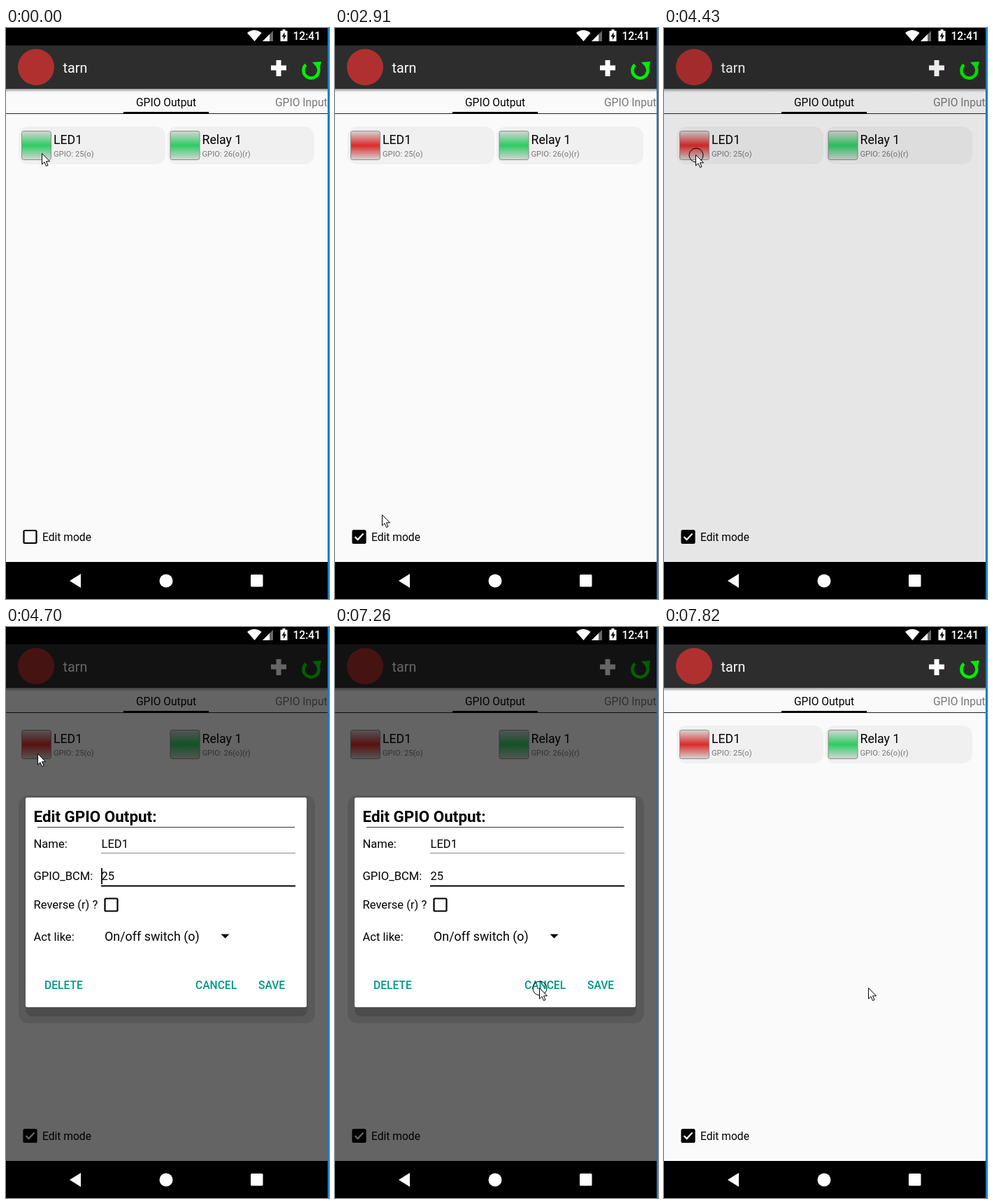
An HTML page that plays this animation: 462 by 817 pixels, repeating every 8000 ms.

```html
<!DOCTYPE html>
<html lang="en">
<head>
<meta charset="utf-8">
<title>GPIO remote</title>
<style>
  html, body { margin: 0; width: 100%; height: 100%; overflow: hidden; background: #000; }
  svg { display: block; width: 462px; height: 817px; font-family: Roboto, sans-serif; }
  .small { font-size: 11.2px; fill: #777; }
  .body { font-size: 15.6px; }
  .form { font-size: 16.6px; }
  .item { font-size: 17.7px; }
  .action { font-size: 15.6px; font-weight: 500; fill: #009688; }
  .check { stroke: #000; stroke-width: 2.2; }
</style>
</head>
<body>
<svg viewBox="0 0 462 817">
  <defs>
    <linearGradient id="green" x2="0" y2="1">
      <stop offset="0" stop-color="#d6d6d6"/>
      <stop offset=".5" stop-color="#2ecc63"/>
      <stop offset="1" stop-color="#d6d6d6"/>
    </linearGradient>
    <linearGradient id="red" x2="0" y2="1">
      <stop offset="0" stop-color="#d6d6d6"/>
      <stop offset=".5" stop-color="#dc2a2a"/>
      <stop offset="1" stop-color="#d6d6d6"/>
    </linearGradient>
    <linearGradient id="shade" x2="0" y2="1">
      <stop offset="0" stop-color="#999"/><stop offset="1" stop-color="#fafafa"/>
    </linearGradient>
    <clipPath id="screen"><rect width="460" height="817"/></clipPath>
  </defs>

  <g clip-path="url(#screen)">
    <rect width="460" height="817" fill="#fafafa"/>
    <rect y="25" width="460" height="62" fill="#2d2d2d"/>
    <rect y="87" width="460" height="5" fill="url(#shade)"/>

    <circle cx="43" cy="56" r="26" fill="#b03030"/>
    <text x="81.5" y="64" font-size="19.8" fill="#fff">tarn</text>
    <path d="M379 57h22M390 46v23" stroke="#fff" stroke-width="7"/>
    <path d="M429 52.5A11 11 0 1 0 445.5 54.5" fill="none" stroke="#00f000" stroke-width="4.5"/>
    <path d="M438 49l13-1-3 12z" fill="#00f000"/>

    <text class="body" x="186" y="112">GPIO Output</text>
    <text class="body" x="385" y="112" fill="#777">GPIO Input</text>
    <path d="M0 122.5h460" stroke="#222"/>
    <path d="M168 121.5h122" stroke="#000" stroke-width="3"/>

    <g id="cards" fill="#f0f0f0">
      <rect x="18" y="141" width="210" height="54" rx="14"/>
      <rect x="231" y="141" width="210" height="54" rx="14"/>
    </g>
    <g stroke="#8c8c8c">
      <rect id="led" x="22.5" y="147.5" width="42" height="41" rx="3"/>
      <rect x="235" y="147.5" width="42" height="41" rx="3" fill="url(#green)"/>
    </g>
    <text class="item" x="68" y="166">LED1</text>
    <text class="small" x="68" y="184">GPIO: 25(o)</text>
    <text class="item" x="280.5" y="166">Relay 1</text>
    <text class="small" x="280.5" y="184">GPIO: 26(o)(r)</text>

    <rect id="box" class="check" x="25.5" y="719" width="18" height="18" rx="1.5"/>
    <path id="tick" d="M28.5 728l4 4 8-8.5" fill="none" stroke="#fff" stroke-width="2.3"/>
    <text class="body" x="52" y="734">Edit mode</text>

    <rect id="dim" y="25" width="460" height="739"/>

    <rect width="460" height="25"/>
    <g fill="#fff">
      <path d="M345 7Q355-1 365.5 7L355.5 19z"/>
      <path d="M382 4v15h-15z" fill="#666"/>
      <path d="M377 9v10h-10z"/>
      <path d="M395.5 4v-2h4v2h3v15h-10v-15z"/>
      <path d="M398.5 6l-4 6.5h2.5v4.5l4-6.5h-2.5z" fill="#000"/>
      <text class="body" x="410.5" y="17" font-weight="500">12:41</text>
    </g>

    <rect y="764" width="460" height="53"/>
    <g fill="#fff">
      <path d="M91 791l16-10v20z"/>
      <circle cx="229" cy="791" r="9.5"/>
      <rect x="350" y="782" width="17.5" height="17.5" rx="1.5"/>
    </g>

    <g id="dialog">
      <rect x="18" y="241" width="424" height="326" rx="14" fill="#595959"/>
      <rect x="28" y="250" width="403" height="307" rx="9" fill="#4c4c4c"/>
      <rect x="28" y="244" width="402" height="300" rx="2.5" fill="#fff"/>
      <text x="39.5" y="279" font-size="22.4" font-weight="700">Edit GPIO Output:</text>
      <path d="M45 286.5h368" stroke="#333"/>
      <g class="form">
        <text x="39.5" y="316">Name:</text>
        <text x="136.5" y="316">LED1</text>
        <text x="39.5" y="362">GPIO_BCM:</text>
        <text x="136.5" y="362">25</text>
        <text x="39.5" y="403">Reverse (r) ?</text>
        <text x="39.5" y="449">Act like:</text>
      </g>
      <path d="M136 323.5h278" stroke="#888"/>
      <path d="M136 370.5h278" stroke="#000" stroke-width="1.8"/>
      <path id="caret" d="M137 345v23" stroke="#000" stroke-width="1.8"/>
      <rect class="check" x="141.5" y="388.5" width="18" height="18" rx="1.5" fill="none"/>
      <text x="141" y="449" font-size="17.9">On/off switch (o)</text>
      <path d="M307.5 439.5h12l-6 6z"/>
      <g class="action">
        <text x="55" y="518">DELETE</text>
        <text x="271" y="518">CANCEL</text>
        <text x="361" y="518">SAVE</text>
      </g>
    </g>
  </g>

  <rect x="460" width="2" height="817" fill="#1779c4"/>

  <g id="pointer" stroke="#000">
    <circle id="ring" cx="1" cy="1" r="10" fill="none"/>
    <path d="M.5.5V16L4 12.7 6.5 18.5 9 17.5 6.5 11.8H11.5z" fill="#fff"/>
  </g>
</svg>
<script>
const LOOP = 8000, HOLD = 262;
const CLICK = { led: 500, edit: 2110, card: 4430, cancel: 7260 };
const OPEN = 4690, CLOSE = 7540, CLEAR = 7820;

const glide = (from, to, start, end) => ({ from, to, start, end });
const LED = [51, 179], MIDWAY = [134, 453], LABEL = [69, 732], CARD = [45, 181], CANCEL = [292, 516];
const GLIDES = [
  glide(LED, MIDWAY, 740, 1262),
  glide(MIDWAY, [67, 710], 1262, 1520),
  glide([67, 710], LABEL, 1520, CLICK.edit),
  glide(LABEL, CARD, 2630, 3930),
  glide(CARD, CANCEL, 4950, 6600)
];

const $ = id => document.getElementById(id);
const show = (id, on) => $(id).setAttribute('visibility', on ? 'inherit' : 'hidden');
const smooth = u => u * u * (3 - 2 * u);

// The pointer is seen only once per hold, so it moves in jumps.
function pointerAt(t) {
  const held = Math.floor((t - 476) / HOLD) * HOLD + 476;
  const { from, to, start, end } = GLIDES.findLast(g => g.start <= held) || GLIDES[0];
  const p = smooth(Math.min(1, Math.max(0, (held - start) / (end - start))));
  return from.map((v, i) => Math.round(v + (to[i] - v) * p));
}

function dimAt(t) {
  if (t < CLICK.card || t >= CLEAR) return 0;
  if (t < OPEN) return .08;
  return t < CLOSE ? .6 : .2;
}

function draw(t) {
  const open = t >= OPEN && t < CLOSE;
  $('pointer').setAttribute('transform', `translate(${pointerAt(t)})`);
  show('ring', Object.values(CLICK).some(c => t >= c && t < c + HOLD));
  $('led').setAttribute('fill', `url(#${t < CLICK.led + 250 ? 'green' : 'red'})`);
  $('box').setAttribute('fill', t < CLICK.edit + 250 ? 'none' : '#000');
  show('tick', t >= CLICK.edit + 500);
  $('dim').setAttribute('opacity', dimAt(t));
  show('cards', !open);
  show('dialog', open);
  show('caret', open && (t - OPEN) % 1000 < 500);
}

const start = performance.now();
function tick() {
  draw((performance.now() - start) % LOOP);
  requestAnimationFrame(tick);
}
tick();
</script>
</body>
</html>
```
